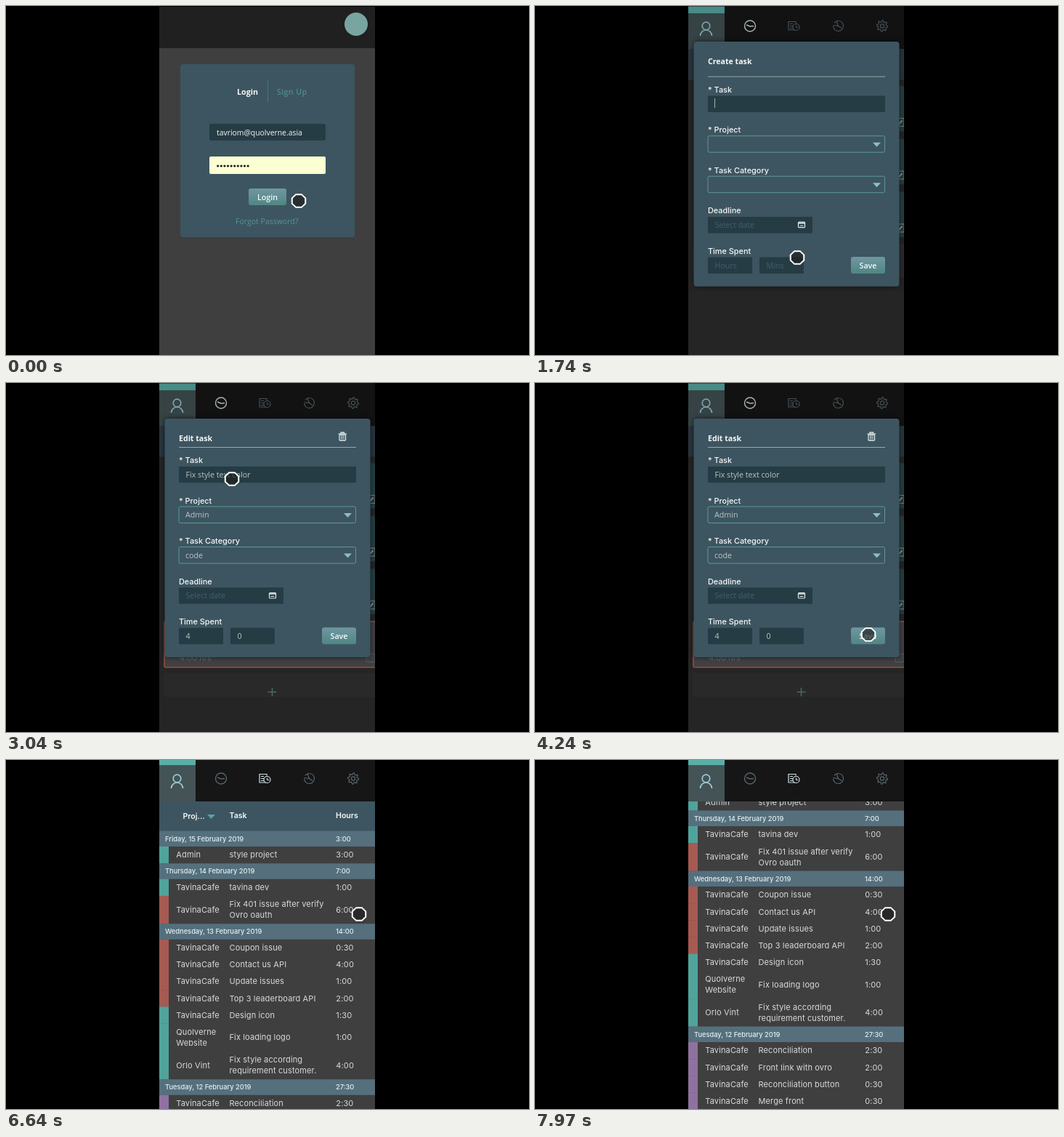
Recreate the animation shown at these times as an HTML page with a canvas. Size 720 by 480 pixels, loop 8000 ms.

```html
<!DOCTYPE html>
<html lang="en">
<head>
<meta charset="utf-8">
<title>Task tracker</title>
<style>
html, body { margin: 0; width: 100%; height: 100%; overflow: hidden; background: #000; }
canvas { display: block; width: 720px; height: 480px; }
</style>
</head>
<body>
<canvas id="stage" width="720" height="480"></canvas>
<script>
const ctx = document.getElementById('stage').getContext('2d');
const LOOP = 8000;
const LEFT = 211, RIGHT = 508;
const UI = 'Inter, sans-serif', FORM = '"Open Sans", sans-serif';
const C = {
  bg: '#3f3f40', panel: '#3d5560', field: '#263c45', card: '#406a70',
  teal: '#50a39b', red: '#a65a52', purple: '#8f729f',
  white: '#f6f8f8', soft: '#b9c6c8', dim: '#58656b', icon: '#d3e0e4'
};

const clamp = v => Math.max(0, Math.min(1, v));
const ramp = (t, a, b) => clamp((t - a) / (b - a));
const ease = u => u * u * (3 - 2 * u);

function rect(x, y, w, h, color, r = 0) {
  ctx.fillStyle = color;
  ctx.beginPath();
  ctx.roundRect(x, y, w, h, r);
  ctx.fill();
}

function frame(x, y, w, h, color, r = 0, width = 1) {
  ctx.strokeStyle = color;
  ctx.lineWidth = width;
  ctx.beginPath();
  ctx.roundRect(x, y, w, h, r);
  ctx.stroke();
}

function line(color, width, ...pts) {
  ctx.strokeStyle = color;
  ctx.lineWidth = width;
  ctx.beginPath();
  for (let i = 0; i < pts.length; i += 2) ctx.lineTo(pts[i], pts[i + 1]);
  ctx.stroke();
}

function poly(color, ...pts) {
  ctx.fillStyle = color;
  ctx.beginPath();
  for (let i = 0; i < pts.length; i += 2) ctx.lineTo(pts[i], pts[i + 1]);
  ctx.fill();
}

function arc(x, y, r, color, width, from = 0, to = Math.PI * 2) {
  ctx.strokeStyle = color;
  ctx.lineWidth = width;
  ctx.beginPath();
  ctx.arc(x, y, r, from, to);
  ctx.stroke();
}

function text(str, x, y, size, color, { font = UI, weight = 400, gap = 0, align = 'left' } = {}) {
  ctx.font = `${weight} ${size}px ${font}`;
  ctx.letterSpacing = gap + 'px';
  ctx.textAlign = align;
  ctx.fillStyle = color;
  ctx.fillText(str, x, y);
}

function layer(alpha, draw) {
  if (alpha <= 0) return;
  ctx.save();
  ctx.globalAlpha *= alpha;
  draw();
  ctx.restore();
}

function button(label, x, y, w, h) {
  const g = ctx.createLinearGradient(0, y, 0, y + h);
  g.addColorStop(0, '#6f97a2');
  g.addColorStop(1, '#4f8683');
  rect(x, y, w, h, g, 3);
  text(label, x + w / 2, y + h / 2 + 4, 10.7, C.white, { font: FORM, weight: 600, align: 'center' });
}

// Login page

function login() {
  rect(LEFT, 1, RIGHT - LEFT, 479, C.bg);
  rect(LEFT, 1, RIGHT - LEFT, 57, '#202020');
  ctx.fillStyle = '#78a59f';
  ctx.beginPath();
  ctx.arc(482, 25, 16, 0, Math.PI * 2);
  ctx.fill();

  rect(240, 80, 240, 238, C.panel, 4);
  text('Login', 318, 122, 10.7, C.white, { font: FORM, weight: 700 });
  line('#48777e', 1, 360.5, 101, 360.5, 133);
  text('Sign Up', 373, 122, 10.6, '#4f8d90', { font: FORM, weight: 600, gap: 0.4 });
  rect(280, 162, 160, 23, C.field, 2);
  text('tavriom@quolverne.asia', 290, 177.5, 10.4, C.white, { font: FORM });
  rect(280, 207, 160, 24, '#fcffd2', 2);
  ctx.fillStyle = '#1c1c1c';
  for (let i = 0; i < 10; i++) {
    ctx.beginPath();
    ctx.arc(291.7 + i * 4.6, 220, 1.6, 0, Math.PI * 2);
    ctx.fill();
  }
  button('Login', 334, 251, 52, 23);
  text('Forgot Password?', 316, 300, 10.5, '#57958f', { font: FORM });
}

// Navigation

function nav(active, dy) {
  const color = name => name === active ? C.icon : C.dim;
  const y = 27.5 + dy;
  rect(LEFT, 0, RIGHT - LEFT, 59 + dy, '#161617');
  rect(LEFT, 0, 50, 59 + dy, '#445355');
  rect(LEFT, dy ? 0 : 1, 50, dy ? 7 : 9, '#5aaea8');
  arc(235.5, y, 5.3, '#9accd4', 1.7);
  arc(235.5, y + 13.5, 8, '#9accd4', 1.7, Math.PI, Math.PI * 2);

  let c = color('clock');
  arc(296, y, 7.5, c, 1.4);
  line(c, 1.4, 291, y - 1.5, 296, y + 0.5, 301, y);

  c = color('history');
  line(c, 1.2, 358, y + 5.5, 349, y + 5.5, 349, y - 6, 359, y - 6, 359, y - 4);
  for (const k of [-3, 0, 3]) line(c, 1, 351, y + k, 355, y + k);
  arc(359.5, y + 1.5, 4.5, c, 1.2);
  line(c, 1, 359.5, y - 1, 359.5, y + 2, 362, y + 2);

  c = C.dim;
  arc(417.5, y, 7, c, 1.2, -2.5, 3.1);
  line(c, 1.2, 410.5, y - 1, 417.5, y, 415, y - 6.5);
  line(c, 1.2, 417.5, y, 422, y + 3);

  arc(478, y, 2.6, c, 1.2);
  ctx.beginPath();
  for (let i = 0; i < 32; i++) {
    const a = i * Math.PI / 16, r = i % 4 < 2 ? 7.5 : 5.6;
    ctx.lineTo(478 + r * Math.cos(a), y + r * Math.sin(a));
  }
  ctx.closePath();
  ctx.stroke();
}

// Task list

const tasks = [
  ['Fix style according requirement customer.', 'Orlo Vint', '4:00 hrs', 'branch', '#b8a78a'],
  ['Design icon', 'Tavina Cafe', '1:30 hrs', 'pencil', '#70828a'],
  ['Fix loading logo', 'Quolverne Website', '1:00 hrs', 'pencil', '#74949c'],
  ['Fix style text color', 'Admin', '4:00 hrs', 'branch', '#b87c74']
];

function taskIcon(kind, x, y, color) {
  if (kind === 'branch') {
    line(color, 1.1, x - 2, y - 4, x - 2, y + 4);
    line(color, 1.1, x - 2, y + 1, x + 2, y - 1, x + 2, y - 4);
  } else {
    line(color, 1.1, x - 4, y + 4, x - 3, y + 1, x + 2, y - 4, x + 4, y - 2, x - 1, y + 3, x - 4, y + 4);
  }
}

function card(i, fresh, selected) {
  const [title, project, hours, icon, tint] = tasks[i];
  const y = 110 + i * 72.7;
  const ink = fresh ? C.white : '#b5bcb6';
  rect(219, y, RIGHT - 219, 62.5, fresh ? '#6f6e71' : C.card, 2);
  if (selected) frame(218, y, 300, 63, '#e07a66', 2, 2);
  taskIcon(icon, 229, y + 11.5, ink);
  text(title, 239, y + 15.7, 11.5, ink, { gap: 0.3, weight: fresh ? 500 : 400 });
  text(project, 239, y + 29, 10, tint, { gap: 0.25 });
  text(hours, 239, y + 53.7, 11, fresh ? '#86bec0' : '#c2cdcb', {});
  frame(496, y + 44.5, 12, 11, fresh ? '#72a3a5' : '#c7d3d4', 1, 1.2);
  if (!fresh) line('#ffffff', 1.8, 498.5, y + 50, 501, y + 52.5, 505.5, y + 47.5);
}

function list(count, total, selected) {
  rect(LEFT, 1, RIGHT - LEFT, 479, C.bg);
  nav('clock', 0);
  rect(LEFT, 59, RIGHT - LEFT, 42.5, '#445c69');
  poly('#7fb0b8', 250, 71, 250, 90, 237, 80.5);
  poly('#7fb0b8', 469, 71, 469, 90, 482, 80.5);
  text('Wed, 13 Feb', 360, 78, 11.2, C.white, { weight: 600, gap: 0.15, align: 'center' });
  text(total, 360, 92.5, 10.3, '#80b0b4', { align: 'center' });
  for (let i = 0; i < count; i++) card(i, i === 3, i === 3 && selected);

  const extra = count > 3;
  const py = extra ? 425 : 352;
  if (extra) rect(217, 399, RIGHT - 217, 33, '#464748', 2);
  else rect(217, 327, RIGHT - 217, 47, '#4a4b4d', 2);
  line('#83adb0', 1.5, 360.5, py, 372.5, py);
  line('#83adb0', 1.5, 366.5, py - 6, 366.5, py + 6);
}

// Task form

function shade() {
  rect(LEFT, 0, RIGHT - LEFT, 59, 'rgba(0,0,0,.2)');
  rect(LEFT, 59, RIGHT - LEFT, 421, 'rgba(0,0,0,.42)');
}

function select(value, y) {
  frame(238, y, 243.5, 22.5, '#5c9799', 2);
  poly('#8fbdc0', 465, y + 9, 476, y + 9, 470.5, y + 15);
  text(value, 247, y + 15, 10.7, C.soft, { font: FORM });
}

function form(edit) {
  const d = edit ? 0 : 8.7;
  const label = (s, y) => text(s, 238, y + d, 10.9, C.white, { weight: 500 });
  const input = (value, x, y, w, color = C.soft) => {
    rect(x, y + d, w, 22.5, C.field, 1);
    text(value, x + 9.5, y + d + 15, 10.7, color, { font: FORM });
  };
  const hint = '#42606a', glyph = '#dce8ea';

  ctx.save();
  ctx.shadowColor = 'rgba(0,0,0,.6)';
  ctx.shadowBlur = 7;
  rect(218.5, 49, 283, 328 + d, C.panel, 4);
  ctx.restore();

  text(edit ? 'Edit task' : 'Create task', 238, 79.7, 10.6, C.white, { font: FORM, weight: 700 });
  line('#98a8a8', 1, 238, 88.5 + d, 482, 88.5 + d);
  if (edit) {
    line(glyph, 1.3, 457.5, 70, 469, 70);
    line(glyph, 1.3, 461, 69.5, 461, 68, 465.5, 68, 465.5, 69.5);
    frame(459, 71, 8.5, 8, glyph, 1, 1.3);
    for (const x of [461.5, 463.2, 465]) line(glyph, 0.8, x, 72, x, 77.5);
  }

  label('* Task', 110);
  input(edit ? 'Fix style text color' : '', 238, 114.8, 244);
  if (!edit) line('#9cb8bc', 1, 247.5, 127, 247.5, 140);
  label('* Project', 165.5);
  select(edit ? 'Admin' : '', 170 + d);
  label('* Task Category', 221);
  select(edit ? 'code' : '', 225.5 + d);
  label('Deadline', 276.5);
  input('Select date', 238, 281.3, 144, hint);
  frame(362.5, 288.5 + d, 9, 7.5, glyph, 1, 1.2);
  line(glyph, 1.6, 362.5, 290 + d, 371.5, 290 + d);
  line(glyph, 1, 364.5, 293.5 + d, 369.5, 293.5 + d);
  label('Time Spent', 332);
  input(edit ? '4' : 'Hours', 238, 336.8, 61, edit ? C.soft : hint);
  input(edit ? '0' : 'Mins', 309, 336.8, 61, edit ? C.soft : hint);
  button('Save', 435, 336.3 + d, 47, 23);
}

// History table

const CAFE = 'TavinaCafe';
const days = [
  ['Friday, 15 February 2019', '3:00', [
    ['Admin', 'style project', '3:00', C.teal]]],
  ['Thursday, 14 February 2019', '7:00', [
    [CAFE, 'tavina dev', '1:00', C.teal],
    [CAFE, 'Fix 401 issue after verify|Ovro oauth', '6:00', C.red]]],
  ['Wednesday, 13 February 2019', '14:00', [
    [CAFE, 'Coupon issue', '0:30', C.red],
    [CAFE, 'Contact us API', '4:00', C.red],
    [CAFE, 'Update issues', '1:00', C.red],
    [CAFE, 'Top 3 leaderboard API', '2:00', C.red],
    [CAFE, 'Design icon', '1:30', C.teal],
    ['Quolverne|Website', 'Fix loading logo', '1:00', C.teal],
    ['Orlo Vint', 'Fix style according|requirement customer.', '4:00', C.teal]]],
  ['Tuesday, 12 February 2019', '27:30', [
    [CAFE, 'Reconciliation', '2:30', C.purple],
    [CAFE, 'Front link with ovro', '2:00', C.purple],
    [CAFE, 'Reconciliation button', '0:30', C.purple],
    [CAFE, 'Merge front', '0:30', C.purple]]]
];

function cell(str, x, mid) {
  const lines = str.split('|');
  lines.forEach((s, i) => {
    text(s, x, mid + 3.8 + (i - (lines.length - 1) / 2) * 15, 11, '#d8dada', { gap: 0.13 });
  });
}

function history(scroll) {
  rect(LEFT, 0, RIGHT - LEFT, 480, C.bg);
  ctx.save();
  ctx.translate(0, -scroll);
  rect(LEFT, 57, RIGHT - LEFT, 41, C.panel);
  const head = { weight: 600 };
  text('Proj...', 243.5, 80.5, 10.6, C.white, head);
  poly('#5f9fa6', 277, 75, 288, 75, 282.5, 81);
  text('Task', 307.5, 80, 10.6, C.white, head);
  text('Hours', 454, 80, 10.6, C.white, head);

  let y = 97.5;
  for (const [date, sum, rows] of days) {
    rect(LEFT, y, RIGHT - LEFT, 21.5, '#556f7d');
    text(date, 219, y + 14.2, 9.3, '#e2f2f4', { weight: 500 });
    text(sum, 454, y + 14.2, 9.3, '#e2f2f4', { weight: 500 });
    y += 21.5;
    for (const [project, task, hours, color] of rows) {
      const h = (project + task).includes('|') ? 38.4 : 23.15;
      rect(LEFT, y, 13, h + 0.3, color);
      cell(project, 234.3, y + h / 2);
      cell(task, 307.5, y + h / 2);
      cell(hours, 454.3, y + h / 2);
      y += h;
    }
  }
  ctx.restore();
  nav('history', -2);
}

// Pointer: time, x, y

const path = [
  [0, 403, 268], [40, 403, 268], [220, 362, 264], [400, 362, 264], [650, 361, 346],
  [1740, 361, 346], [2350, 311, 132], [3240, 311, 132], [3950, 459, 346],
  [4950, 459, 346], [5650, 433.5, 331], [5970, 433.5, 331], [6200, 356, 28],
  [6330, 356, 28], [6600, 486, 212], [LOOP, 486, 212]
];

function pointer(t) {
  const i = Math.max(1, path.findIndex(p => p[0] >= t));
  const [t0, x0, y0] = path[i - 1], [t1, x1, y1] = path[i];
  const u = ease(ramp(t, t0, t1));
  const x = x0 + (x1 - x0) * u, y = y0 + (y1 - y0) * u;
  ctx.beginPath();
  for (let k = 0; k < 8; k++) {
    const a = (k + 0.5) * Math.PI / 4;
    ctx.lineTo(x + 10 * Math.cos(a), y + 9.6 * Math.sin(a));
  }
  ctx.closePath();
  ctx.fillStyle = 'rgba(28,28,28,.65)';
  ctx.fill();
  ctx.strokeStyle = '#ffffff';
  ctx.lineWidth = 2;
  ctx.stroke();
}

function createScene(t) {
  list(3, '6:30 hrs', false);
  layer(ease(ramp(t, 870, 1070)), () => { shade(); form(false); });
}

function editScene(t) {
  const open = 1 - ease(ramp(t, 4400, 4600));
  list(4, '10:30 hrs', open > 0.5);
  layer(open, () => { shade(); form(true); });
}

function draw(t) {
  ctx.fillStyle = '#000';
  ctx.fillRect(0, 0, 720, 480);
  ctx.save();
  ctx.beginPath();
  ctx.rect(LEFT, 0, RIGHT - LEFT, 480);
  ctx.clip();
  const listIn = ramp(t, 270, 420), editIn = ramp(t, 2490, 2660), tableIn = ramp(t, 6270, 6390);
  if (listIn < 1) login();
  if (editIn < 1) layer(listIn, () => createScene(t));
  if (tableIn < 1) layer(editIn, () => editScene(t));
  layer(tableIn, () => history(72.7 * ease(ramp(t, 6830, 7600))));
  pointer(t);
  ctx.restore();
}

function tick(now) {
  draw(now % LOOP);
  requestAnimationFrame(tick);
}
requestAnimationFrame(tick);
</script>
</body>
</html>
```
